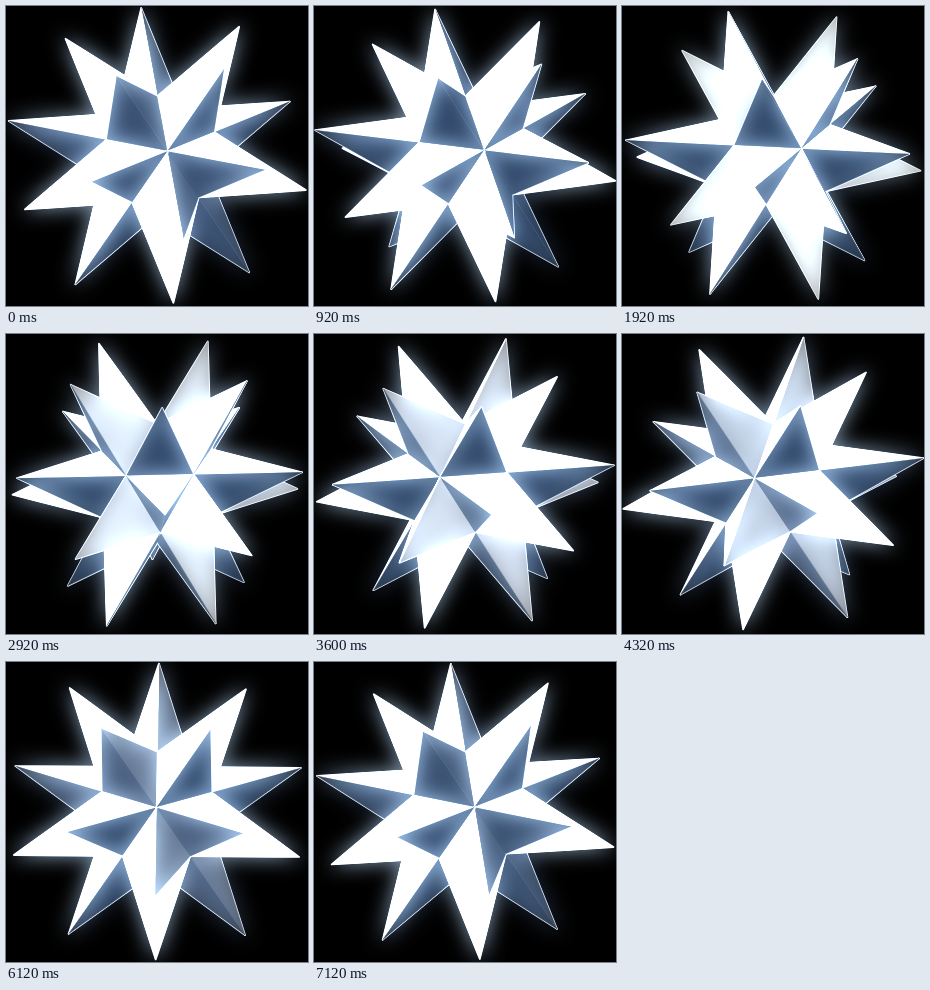
An HTML page with a canvas for the animation above (7240 ms loop, 302x300 px).

```html
<!DOCTYPE html>
<html lang="en">
<head>
<meta charset="utf-8">
<title>Rotating star</title>
<style>
html, body { margin: 0; width: 100%; height: 100%; overflow: hidden; background: #000; }
canvas { display: block; }
</style>
</head>
<body>
<canvas id="stage" width="302" height="300"></canvas>
<script>
const W = 302, H = 300, CX = 151.3, CY = 149.5;
const TIP = 152.7, PIT = TIP * 0.4194;
const RAD = Math.PI / 180, TILT = 23 * RAD;
const LOOP = 7240, STEPS = 72;
const LIGHT = [-0.4, 0.65, 0.65];
const GLOW = 'rgb(138,162,186)', EDGE = 'rgb(225,232,242)';

// Facing to the light, then colour before the glow is added
const RAMP = [
  [0.04, 32, 45, 62],
  [0.21, 98, 102, 110],
  [0.28, 128, 130, 134],
  [0.39, 148, 148, 148],
  [0.48, 172, 172, 168],
  [0.56, 255, 255, 255]
];

const ctx = document.getElementById('stage').getContext('2d');
const layer = document.createElement('canvas');
layer.width = W;
layer.height = H;
const pen = layer.getContext('2d');
pen.lineJoin = 'round';

const dot = (a, b) => a[0] * b[0] + a[1] * b[1] + a[2] * b[2];

// Unit vector with y up and longitude 0 towards the viewer
function direction(lat, lon) {
  const c = Math.cos(lat * RAD);
  return [c * Math.sin(lon * RAD), Math.sin(lat * RAD), c * Math.cos(lon * RAD)];
}

const ring = (lat, lon) => [0, 1, 2, 3, 4].map(i => direction(lat, lon + 72 * i));

// Great stellated dodecahedron: pits double as the twelve plane normals
const pits = [direction(90, 0), ...ring(26.565, 0), ...ring(-26.565, 36), direction(-90, 0)];
const tips = [...ring(52.623, 36), ...ring(10.812, 36), ...ring(-10.812, 0), ...ring(-52.623, 0)];
const indices = pits.map((_, i) => i);

const spikes = tips.map((tip, id) => {
  const base = indices.filter(i => dot(pits[i], tip) > 0.7);
  const planes = indices.filter(i => Math.abs(dot(pits[i], tip) - 0.188) < 0.05);
  const faces = planes.map(plane => ({
    plane,
    base: base.filter(i => dot(pits[i], pits[plane]) > 0)
  }));
  return { id, faces };
});

function view(v, angle) {
  const s = Math.sin(angle), c = Math.cos(angle);
  const x = v[0] * c + v[2] * s, z = v[2] * c - v[0] * s;
  return [
    x,
    v[1] * Math.cos(TILT) - z * Math.sin(TILT),
    v[1] * Math.sin(TILT) + z * Math.cos(TILT)
  ];
}

function shade(normal) {
  const d = dot(normal, LIGHT);
  let i = 0;
  while (i < RAMP.length - 2 && d > RAMP[i + 1][0]) i++;
  const a = RAMP[i], b = RAMP[i + 1];
  const u = Math.min(1, Math.max(0, (d - a[0]) / (b[0] - a[0])));
  return `rgb(${[1, 2, 3].map(n => Math.round(a[n] + (b[n] - a[n]) * u)).join()})`;
}

function trace(points) {
  pen.beginPath();
  points.forEach(p => pen.lineTo(CX + p[0], CY - p[1]));
}

function drawStar(angle) {
  const normals = pits.map(p => view(p, angle));
  const peaks = tips.map(t => view(t, angle));
  const sized = (v, r) => v.map(n => n * r);
  pen.clearRect(0, 0, W, H);

  // Spikes fill separate cones, so the depth of the tip gives the right order
  const order = [...spikes].sort((a, b) => peaks[a.id][2] - peaks[b.id][2]);
  for (const spike of order) {
    const tip = sized(peaks[spike.id], TIP);
    const faces = spike.faces.filter(f => normals[f.plane][2] > 0).map(f => ({
      color: shade(normals[f.plane]),
      points: [sized(normals[f.base[0]], PIT), tip, sized(normals[f.base[1]], PIT)]
    }));
    pen.lineWidth = 1.8;
    pen.strokeStyle = EDGE;
    for (const f of faces) {
      trace(f.points);
      pen.stroke();
    }
    pen.lineWidth = 0.4;
    for (const f of faces) {
      trace(f.points);
      pen.closePath();
      pen.fillStyle = pen.strokeStyle = f.color;
      pen.fill();
      pen.stroke();
    }
  }
}

function compose() {
  ctx.globalCompositeOperation = 'source-over';
  ctx.fillStyle = '#000';
  ctx.fillRect(0, 0, W, H);
  ctx.filter = 'blur(10px)';
  ctx.drawImage(layer, 0, 0);
  ctx.filter = 'none';
  ctx.globalCompositeOperation = 'multiply';
  ctx.fillStyle = GLOW;
  ctx.fillRect(0, 0, W, H);
  ctx.globalCompositeOperation = 'lighter';
  ctx.drawImage(layer, 0, 0);
}

const start = performance.now();
let shown = -1;

function frame() {
  const t = (performance.now() - start) % LOOP;
  // One degree per 100 ms, held on a 40 ms clock
  const step = Math.min(STEPS - 1, Math.floor(Math.floor(t / 40) * 2 / 5));
  if (step !== shown) {
    shown = step;
    drawStar((10 + step) * RAD);
    compose();
  }
  requestAnimationFrame(frame);
}
frame();
</script>
</body>
</html>
```
